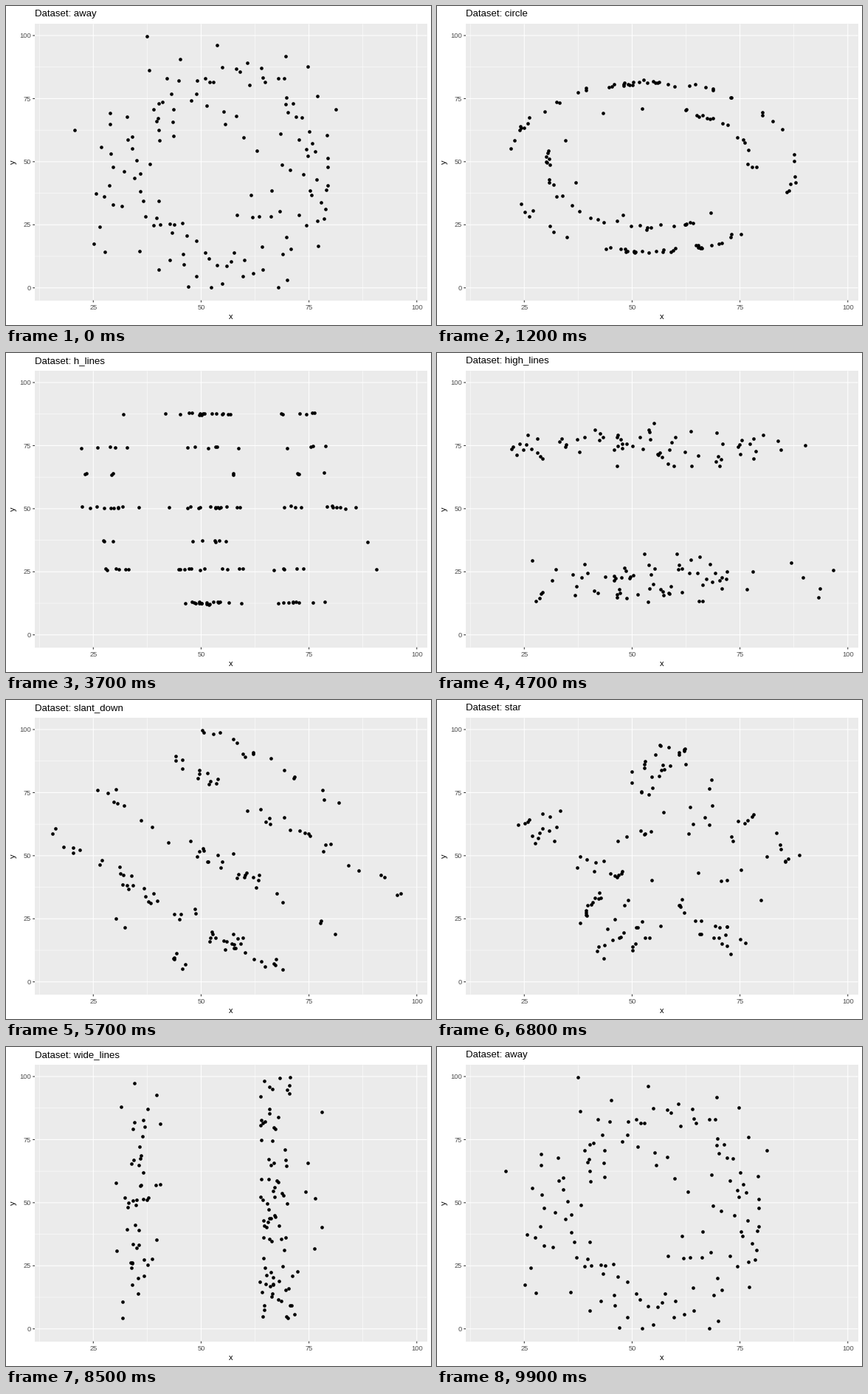
A matplotlib script that plays this animation: 576x432 px, repeating every 10 s.

```python
import numpy as np
import matplotlib.pyplot as plt
from matplotlib.animation import FuncAnimation

W, H, DPI = 576, 432, 72
LEFT, RIGHT, TOP, BOTTOM = 39.0, 570.5, 24.4, 398.6
FONT = "Liberation Sans"
CENTER, SPREAD = np.array([54.3, 47.8]), np.array([16.8, 26.9])
rng = np.random.default_rng(12)


def px(x):
    return 118.3 + (np.asarray(x) - 25) * 5.846


def py(y):
    return 381.7 - np.asarray(y) * 3.417


# ---- point sets -------------------------------------------------------

def stroke(n, *keys):
    """n dots evenly spaced along a smooth curve through the keys."""
    p = np.array(keys, float)
    k = np.append(0, np.cumsum(np.hypot(*np.diff(p, axis=0).T)))
    slope = np.gradient(p, k, axis=0)
    t = np.linspace(0, k[-1], n)
    i = np.clip(np.searchsorted(k, t, side="right") - 1, 0, len(k) - 2)
    h = (k[i + 1] - k[i])[:, None]
    u = (t - k[i])[:, None] / h
    return ((2 * u**3 - 3 * u**2 + 1) * p[i] + (u**3 - 2 * u**2 + u) * h * slope[i]
            + (3 * u**2 - 2 * u**3) * p[i + 1] + (u**3 - u**2) * h * slope[i + 1])


def make_dino():
    face = stroke(31, (55.4, 97.2), (46, 94.5), (36, 80), (23, 66.5), (22.3, 57),
                  (26, 51), (37, 51.3), (53, 55.6), (60, 59), (61.8, 69.1))
    arm = stroke(15, (57.4, 55.3), (48.2, 38.3), (42.8, 32.6), (35, 30.3),
                 (30, 36.8), (38.2, 49.1))
    belly = stroke(23, (29.7, 36), (32, 26.8), (44, 25.6), (56.7, 42.2),
                   (68, 48), (71.5, 62), (69.5, 69.5))
    eye = stroke(11, (46.9, 79.9), (50, 85.3), (56.7, 86), (53.8, 80.6), (47.9, 77.6))
    nostril = stroke(3, (29.7, 59.9), (29.7, 62.2), (31.3, 62.6))
    back = stroke(21, (57.9, 99.5), (68.5, 94), (78, 71), (87, 47), (98.2, 33.7))
    leg = stroke(6, (56.7, 40.6), (60.8, 34), (64.4, 24.1))
    foot = stroke(12, (74.4, 22.9), (61, 19), (52, 18.3), (44.9, 13.7))
    toe = stroke(4, (48.7, 14.9), (56.2, 14.3))
    claw = stroke(4, (52, 12.6), (48, 10.5), (46.2, 6))
    sole = stroke(9, (50.5, 9.5), (57, 10.5), (78.2, 10.6))
    heel = stroke(3, (68.2, 8.7), (68.2, 2.9))
    return np.vstack([face, arm, belly, eye, nostril, back, leg, foot, toe, claw,
                      sole, heel])


dino = make_dino()
COUNT = len(dino)


def jitter(p, sx, sy=None):
    return p + rng.normal(size=p.shape) * [sx, sx if sy is None else sy]


def loose(s=2.5):
    return jitter(dino, s)


def scattered():
    """Loose oval ring, thin in the middle."""
    angle = rng.permutation(COUNT) * 2 * np.pi / COUNT
    radius = rng.normal(1.36, .34, COUNT)[:, None]
    return CENTER + SPREAD * radius * np.column_stack([np.cos(angle), np.sin(angle)])


def snap(p, segments, spread):
    """Move every dot to the nearest segment (x0, y0, x1, y1)."""
    s = np.array(segments, float)
    a, d = s[:, :2], s[:, 2:] - s[:, :2]
    u = ((p[:, None] - a) * d).sum(2) / (d**2).sum(1)
    foot = a + np.clip(u, 0, 1)[..., None] * d
    best = ((foot - p[:, None])**2).sum(2).argmin(1)
    return jitter(foot[np.arange(len(p)), best], spread)


def nearest(values, levels):
    levels = np.array(levels)
    return levels[np.abs(values[:, None] - levels).argmin(1)]


def rings(p, radii, spread):
    d = p - CENTER
    r = np.hypot(*d.T)
    return jitter(CENTER + d * (nearest(r, radii) / r)[:, None], spread)


def grid_dots(p):
    x, y = nearest(p[:, 0], [25.5, 51, 75.5]), nearest(p[:, 1], [18, 51.5, 83])
    return jitter(np.column_stack([x, y]), .9, .4)


def high_bands(p):
    y = np.where(p[:, 1] > 48, 75, 21) + np.clip(rng.normal(0, 4.5, COUNT), -8, 11)
    return np.column_stack([p[:, 0], y])


def wide_bands(p):
    left = np.clip(rng.normal(35, 2.8, COUNT), 27.5, 40.6)
    right = np.clip(63.5 + rng.gamma(1.5, 2.8, COUNT), 62.5, 78)
    return np.column_stack([np.where(p[:, 0] < 49, left, right), p[:, 1]])


def star_edges():
    angle = np.pi / 2 + np.arange(11) * np.pi / 5
    radius = np.where(np.arange(11) % 2, .4, 1)
    x, y = 60 + 34 * radius * np.cos(angle), 47 + 43 * radius * np.sin(angle)
    return np.column_stack([x[:-1], y[:-1], x[1:], y[1:]])


levels = (10, 30, 50, 70, 90)
offsets = (-50, -30, 0, 30, 50)
STATES = {
    "away": scattered(),
    "bullseye": rings(loose(), [18, 37], .6),
    "circle": rings(loose(), [30], .8),
    "dino": dino,
    "dots": grid_dots(dino),
    "h_lines": snap(loose(1.5), [(0, y, 100, y) for y in levels], .35),
    "high_lines": high_bands(loose()),
    "slant_down": snap(loose(), [(0, 102 + b, 102 + b, 0) for b in offsets], 1.1),
    "slant_up": snap(loose(), [(0, b, 100, 100 + b) for b in offsets], 1.1),
    "star": snap(loose(), star_edges(), .5),
    "v_lines": snap(loose(1.5), [(x, 0, x, 100) for x in levels], .35),
    "wide_lines": wide_bands(loose(3.5)),
    "x_shape": snap(loose(), [(29, 0, 80, 97), (29, 97, 80, 0)], 1.3),
}
NAMES = list(STATES)
CLOUDS = [np.clip(p, [15.6, .1], [98.2, 99.6]) for p in STATES.values()]

# Frames per transition; each finished picture rests between them.
STEPS = np.array([6] * 6 + [5] + [6] * 3 + [5] * 3)
STARTS = 2 + np.append(0, np.cumsum(STEPS + 2)[:-1])

# ---- stage ------------------------------------------------------------

fig = plt.figure(figsize=(W / DPI, H / DPI), dpi=DPI, facecolor="white")
ax = fig.add_axes([0, 0, 1, 1])
ax.set_xlim(0, W)
ax.set_ylim(H, 0)
ax.axis("off")


def line(x, y, color, width, z):
    ax.plot(x, y, color=color, lw=width, zorder=z, snap=False, solid_capstyle="butt")


def label(x, y, s, size, color="black", **kw):
    return ax.text(x, y, s, fontsize=size, color=color, family=FONT,
                   va="baseline", **kw)


ax.add_patch(plt.Rectangle((LEFT, TOP), RIGHT - LEFT, BOTTOM - TOP,
                           fc="#EBEBEB", ec="none", zorder=0))
for v in np.arange(0, 101, 12.5):
    major = v % 25 == 0
    width = 1.07 if major else .53
    x, y = px(v), py(v)
    if v > 0:
        line([x, x], [TOP, BOTTOM], "white", width, 1 + major)
    line([LEFT, RIGHT], [y, y], "white", width, 1 + major)
    if major:
        line([LEFT - 2.75, LEFT], [y, y], "#333333", 1.07, 3)
        label(34.1, y + 3.1, f"{v:.0f}", 9.2, "#4D4D4D", ha="right")
        if v > 0:
            line([x, x], [BOTTOM, BOTTOM + 2.75], "#333333", 1.07, 3)
            label(x, 411, f"{v:.0f}", 9.2, "#4D4D4D", ha="center")

label((LEFT + RIGHT) / 2, 424, "x", 11, ha="center")
label(13.4, 211.5, "y", 11, rotation=90, rotation_mode="anchor", ha="center")
title = label(LEFT, 14.4, "", 13.2)
dots = ax.scatter([], [], s=4.65**2, c="black", linewidths=0, zorder=4)


def draw(frame):
    state = max(np.searchsorted(STARTS, frame, side="right") - 1, 0)
    part = np.clip((frame - STARTS[state] + 1) / STEPS[state], 0, 1)
    if frame < STARTS[0]:
        part = 0
    following = (state + 1) % len(NAMES)
    p = CLOUDS[state] * (1 - part) + CLOUDS[following] * part
    dots.set_offsets(np.column_stack([px(p[:, 0]), py(p[:, 1])]))
    title.set_text("Dataset: " + NAMES[following if part >= .5 else state])
    return dots, title


anim = FuncAnimation(fig, draw, frames=100, interval=100, repeat=True,
                     repeat_delay=0, blit=False)
plt.show()
```
